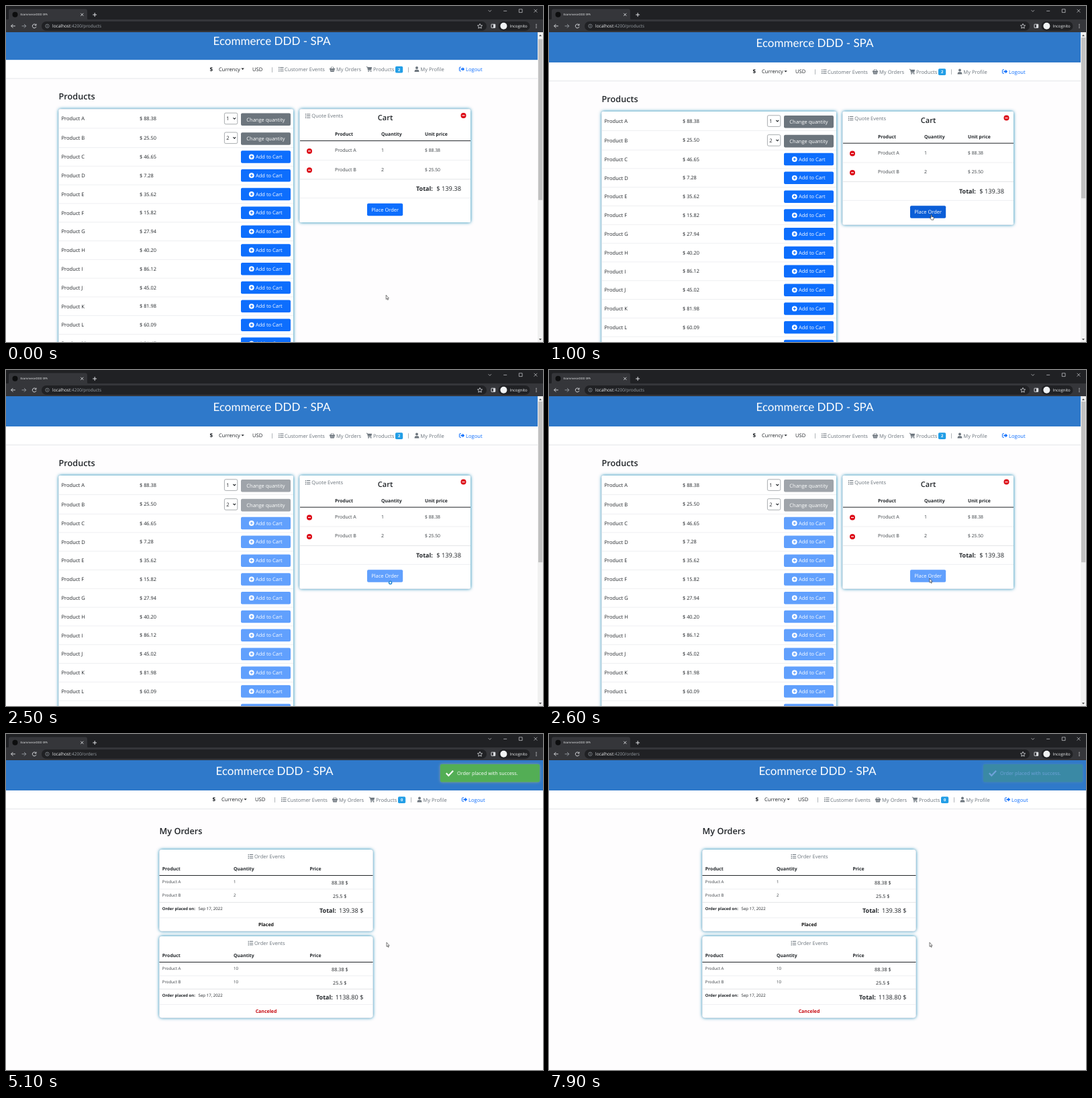
An HTML page that plays this animation: 800 by 500 pixels, repeating every 8 s.

```html
<!DOCTYPE html>
<html lang="en">
<head>
<meta charset="utf-8">
<title>Ecommerce DDD - SPA</title>
<style>
  html, body { margin: 0; height: 100%; overflow: hidden; background: #fefdfe; }
  svg { display: block; width: 800px; height: 500px; font-family: "Open Sans", "Noto Sans", sans-serif; text-rendering: geometricPrecision; }
  .title { font-family: Lato, sans-serif; }
</style>
</head>
<body>
<svg id="stage" viewBox="0 0 800 500"></svg>
<script>
const INK = '#212529', GRAY = '#6c757d', BLUE = '#0d6efd', RED = '#dc0814', LIGHT = '#e3e5e8';
const LOOP = 8000, STEP = 100, ROUTE_CHANGE = 2700;
const PRICES = [88.38, 25.5, 46.65, 7.28, 35.62, 15.82, 27.94, 40.2, 86.12, 45.02, 81.98, 60.09, 31.47];

const clamp = v => Math.max(0, Math.min(1, v));

// Drawing helpers; text is centred vertically on y
const text = (x, y, s, size = 7.6, fill = INK, weight = 400, anchor = 'start', more = '') =>
  `<text x="${x}" y="${y + size * .357}" font-size="${size}" fill="${fill}" font-weight="${weight}" text-anchor="${anchor}" ${more}>${s}</text>`;
const bold = (x, y, s, size = 6.9, fill = INK, anchor) => text(x, y, s, size, fill, 700, anchor);
const rect = (x, y, w, h, fill, r = 0, more = '') =>
  `<rect x="${x}" y="${y}" width="${w}" height="${h}" rx="${r}" fill="${fill}" ${more}/>`;
const circle = (x, y, r, fill, more = '') => `<circle cx="${x}" cy="${y}" r="${r}" fill="${fill}" ${more}/>`;
const stroke = (d, color, width = 1, more = '') =>
  `<path d="${d}" fill="none" stroke="${color}" stroke-width="${width}" ${more}/>`;
const fill = (d, color, more = '') => `<path d="${d}" fill="${color}" ${more}/>`;
const hline = (x, y, w, color = LIGHT, width = .6) => stroke(`M${x} ${y}h${w}`, color, width);
const group = (x, y, body, more = '') => `<g transform="translate(${x} ${y})" ${more}>${body}</g>`;
const card = (x, y, w, h, r) => rect(x, y, w, h, '#fff', r, 'filter="url(#glow)"');
const button = (x, y, w, h, color, body, opacity) =>
  `<g opacity="${opacity}">${rect(x, y, w, h, color, 2)}${body}</g>`;

// Icons, centred on x, y
const listIcon = (x, y) => group(x, y, [-2.6, 0, 2.6].map(d =>
  rect(-3.8, d - .7, 1.4, 1.4, GRAY, .3) + rect(-1.6, d - .5, 5.4, 1, GRAY, .3)).join(''));
const basketIcon = (x, y) => group(x, y,
  stroke('M-2.6-.8L-.8-3.7M2.6-.8L.8-3.7', GRAY) +
  fill('M-4.2-1.2h8.4v1.2h-.6l-.7 3.2q-.2.7-.8.7h-4.2q-.6 0-.8-.7L-3.6 0h-.6z', GRAY) +
  stroke('M-1.5.6v2M0 .6v2M1.5.6v2', '#fff', .5));
const cartIcon = (x, y) => group(x, y,
  stroke('M-4.2-3.3h1.5l1.4 5.4H3.4', GRAY, .9) + fill('M-2.4-2.8h6.6l-1 3.9h-4.6z', GRAY) +
  circle(-1, 3.4, .8, GRAY) + circle(2.7, 3.4, .8, GRAY));
const userIcon = (x, y) => group(x, y,
  circle(0, -1.9, 2, GRAY) + fill('M-3.4 4v-.8q0-2.4 2.4-2.4h2q2.4 0 2.4 2.4V4z', GRAY));
const logoutIcon = (x, y) => group(x, y,
  stroke('M-1-2.8h-1.7q-.9 0-.9.9v3.8q0 .9.9.9H-1', BLUE) +
  fill('M-1.6-.9H1v-2L4.2 0 1 2.9v-2h-2.6z', BLUE));
const removeIcon = (x, y) => circle(x, y, 4, RED) + rect(x - 2, y - .6, 4, 1.2, '#fff');
const addIcon = (x, y) => circle(x, y, 3.9, '#fff') + stroke(`M${x - 2} ${y}h4M${x} ${y - 2}v4`, BLUE, 1.1);

const arrow = fill('M0 0V6.2L1.4 5l1 2.2 .9-.4-1-2.1H4.2z', '#fff', 'stroke="#222" stroke-width=".6"');
const hand = fill('M0 .5q.6-.9 1.2 0V3l2.6.6q.6.2.5 1L3.8 7.8H.6L-1.6 4.8q.3-.9 1.6.1z', '#fff', 'stroke="#111" stroke-width=".6"');
const spinner = circle(3.3, 6.3, 2.1, '#dff0fb', 'stroke="#1a80cf" stroke-width="1.3"');

function header(count) {
  return rect(-8, 39, 820, 45, '#2f79ca') +
    text(396, 55.2, 'Ecommerce DDD - SPA', 17, '#fff', 400, 'middle', 'class="title"') +
    rect(-8, 84, 820, 27.5, '#fff') + hline(-8, 111.5, 820, '#dfe1e4', .8) +
    bold(303.6, 97.5, '$', 8.2) + text(317, 97.5, 'Currency') + fill('M350.4 96.2h4.4l-2.2 2.4z', INK) +
    text(367, 97.5, 'USD') + text(396.5, 97.5, '|', 7.6, GRAY, 400, 'middle') +
    listIcon(409.8, 97.7) + text(415, 98, 'Customer Events', 7.6, GRAY) +
    basketIcon(486, 97.7) + text(492, 98, 'My Orders', 7.6, GRAY) +
    cartIcon(541, 97.5) + text(547, 98, 'Products', 7.6, GRAY) +
    rect(580, 93.3, 11.2, 9.8, '#229ee6', 1.8) + bold(585.6, 98.2, count, 5.8, '#fff', 'middle') +
    text(599.5, 97.5, '|', 7.6, GRAY, 400, 'middle') +
    userIcon(612, 97.5) + text(617.3, 98, 'My Profile', 7.6, GRAY) +
    logoutIcon(679, 97.5) + text(685, 98, 'Logout', 7.6, BLUE);
}

function productRow(price, i, opacity) {
  const inCart = i < 2, y = inCart ? 171 + 28.8 * i : 228 + 27.8 * (i - 2);
  const action = inCart
    ? rect(325.4, y - 8.2, 19.4, 16.6, '#fff', 2, 'stroke="#858a8f" stroke-width=".7"') +
      text(328.2, y + .2, i + 1) + stroke(`M338.4 ${y - 1}l1.9 1.9 1.9-1.9`, INK, 1.1) +
      button(350, y - 8, 74, 18.6, GRAY, text(387, y + 1.6, 'Change quantity', 7.5, '#fff', 400, 'middle'), opacity)
    : button(350, y - 9.2, 74, 18.5, BLUE, addIcon(365.8, y) + text(372, y, 'Add to Cart', 7.5, '#fff'), opacity);
  return text(82.5, y, 'Product ' + String.fromCharCode(65 + i)) + text(199, y, '$ ' + price.toFixed(2), 7.4) +
    action + hline(79, y + (inCart ? 14.5 : 13.9), 349);
}

function cart(t, opacity) {
  const hovered = t >= 1000 && t < 2200;
  const ring = t < 2200 ? clamp((t - 1700) / 300) : 0;
  const items = [['A', 1], ['B', 2]].map(([name, quantity], i) => {
    const y = 218.6 + 28.4 * i;
    return removeIcon(452, y + .9) + text(490, y, 'Product ' + name, 7, '#3b4045') +
      text(559, y, quantity, 7, '#3b4045') + text(624, y, '$ ' + PRICES[i].toFixed(2), 6.8, '#3b4045');
  }).join('');
  return card(437.5, 157, 254.5, 168.5, 2.5) +
    listIcon(449.6, 167.2) + text(455.3, 167.3, 'Quote Events', 7.5, GRAY) +
    text(565, 169.8, 'Cart', 11, INK, 600, 'middle') + removeIcon(681.5, 166.6) +
    bold(490, 194.5, 'Product') + bold(559, 194.5, 'Quantity') + bold(624, 194.5, 'Unit price') +
    hline(438, 204.2, 254, INK, 1) + items + hline(438, 233, 254) + hline(438, 261.4, 254, '#ced2d6') +
    bold(611, 275.4, 'Total:', 9) + text(678, 275.6, '$ 139.38', 9.3, INK, 400, 'end') +
    hline(438, 289.4, 254) +
    rect(537.2, 296.4, 54.8, 20.4, 'none', 3, `stroke="#86b6fe" stroke-width="2" opacity="${ring}"`) +
    button(538, 297.3, 53.2, 18.5, hovered ? '#0b5ed7' : BLUE,
      text(564.6, 306.8, 'Place Order', 7.5, '#fff', 400, 'middle'), opacity);
}

function productsPage(t) {
  const scroll = t < 500 ? 3.6 : 0;
  const opacity = 1 - .35 * clamp((t - 2100) / 200);
  return group(0, -scroll, header(2) + text(78.5, 138, 'Products', 12.7, INK, 600) +
      card(78.5, 157, 349.5, 400, 2.5) + PRICES.map((p, i) => productRow(p, i, opacity)).join('') + cart(t, opacity)) +
    rect(792, 39, 8, 461, '#f1f1f1') + rect(793, 46.8 + scroll * .7, 6.2, 239.4, '#c1c1c1') +
    fill('M794 45l2-2.4 2 2.4z', '#505050') + fill('M794 495l2 2.4 2-2.4z', '#505050');
}

function order(y, quantities, total, status, color) {
  const items = quantities.map((quantity, i) =>
    text(232.8, 48 + 19.8 * i, 'Product ' + 'AB'[i], 6.1, '#3b4045') +
    text(339, 48 + 19.8 * i, quantity, 6.1, '#3b4045') +
    text(497.3, 49.4 + 19.8 * i, PRICES[i] + ' $', 7.25, INK, 400, 'middle') +
    hline(228.5, 58.8 + 19.8 * i, 318, i ? '#ced2d6' : LIGHT)).join('');
  const totalX = 532.4 - total.length * 4.95 - 1;
  return group(0, y, card(228.5, 0, 318, 121.2, 4) +
    listIcon(364.4, 10.2) + text(370, 10.2, 'Order Events', 7.5, GRAY) +
    bold(232.8, 29, 'Product') + bold(339, 29, 'Quantity') + bold(452.4, 29, 'Price') +
    hline(228.5, 38.5, 318, INK, 1) + items +
    bold(232.8, 87.6, 'Order placed on:', 5.95) + text(286.6, 87.8, 'Sep 17, 2022', 6.1) +
    bold(totalX, 91, 'Total:', 9, INK, 'end') + text(532.4, 91.2, total, 9.2, INK, 400, 'end') +
    hline(228.5, 101.6, 318) + bold(387.5, 111.5, status, 7, color, 'middle'));
}

function ordersPage(t) {
  const shown = t < 7500 ? clamp((t - 2600) / 400) : 1 - ((t - 7500) / 480) ** 2;
  return group(4, 0, header(0)) + text(228.6, 144.6, 'My Orders', 12.7, INK, 600) +
    order(172, [1, 2], '139.38 $', 'Placed', '#111') +
    order(301, [10, 10], '1138.80 $', 'Canceled', '#c5050c') +
    `<g opacity="${shown}">` + rect(647, 45, 148, 26.5, '#52ae54', 2, 'filter="url(#shade)"') +
    stroke('M655.8 58.3l3.5 3.6 6.8-7.2', '#fff', 2.2) +
    text(672, 58.4, 'Order placed with success.', 7.3, '#fff') + '</g>';
}

function browser(path) {
  const pale = '#dfe1e5', dim = '#9aa0a6';
  return rect(0, 0, 800, 20.5, '#202124') + rect(0, 20, 800, 19, '#35363a') +
    fill('M2 20.5q2 0 2-2V7.5q0-3 3-3H118q3 0 3 3v11q0 2 2 2z', '#35363a') +
    circle(13.5, 12.8, 4, '#0c0d0e') + text(21.5, 12.7, 'EcommerceDDD SPA', 4.2, '#f1f3f4') +
    stroke('M111.3 10.8l4 4m0-4l-4 4', pale, .9) + stroke('M129.3 13h5.8M132.2 10.1v5.8', pale) +
    stroke('M718.6 6.2l2.2 2.2 2.2-2.2M741.2 7.4h5M764.3 4.8h4.8v4.8h-4.8zM786.6 4.8l4.8 4.8m0-4.8l-4.8 4.8', '#d0d2d5', .7) +
    stroke('M13.8 29.8H7.6m2.8-2.8l-2.8 2.8 2.8 2.8', pale, .9) +
    stroke('M23.6 29.8h6.2m-2.8-2.8l2.8 2.8-2.8 2.8', dim, .9) +
    stroke('M44.6 28.2a2.9 2.9 0 1 0 .4 2.6M45 26.6v2.2h-2.3', pale, .9) +
    rect(53, 23, 663, 13.8, '#202124', 6.9) +
    circle(61.5, 29.8, 2.7, 'none', `stroke="${dim}" stroke-width=".7"`) + stroke('M61.5 29.4v1.8M61.5 28v.7', dim, .7) +
    text(69, 29.8, `localhost<tspan fill="${dim}">:4200/${path}</tspan>`, 6.5, '#f1f3f4') +
    stroke('M706 26.4l1.1 2.3 2.5.3-1.9 1.7.5 2.5-2.2-1.2-2.2 1.2.5-2.5-1.9-1.7 2.5-.3z', pale, .8) +
    rect(723, 27.2, 5.8, 5.2, 'none', .4, `stroke="${pale}" stroke-width=".9"`) + rect(726, 27.2, 2.8, 5.2, pale) +
    rect(733.5, 23, 47, 13.8, '#202124', 6.9) + circle(741.4, 29.8, 5, '#f1f3f4') +
    text(750.6, 29.9, 'Incognito', 6, '#f1f3f4') +
    [27.4, 29.8, 32.2].map(y => circle(790, y, .7, pale)).join('');
}

function pointer(t) {
  if (t < 500) return group(566.2, 430.2, arrow);
  if (t >= 2600) return group(567, 310.2, arrow);
  if (t >= 2200) return group(569.3, 310.2, spinner);
  const k = clamp((t - 600) / 400);
  return group(570 - k, 385.8 - 75.4 * k * k * (3 - 2 * k), k < 1 ? arrow : hand);
}

const defs = `<defs>
  <filter id="glow" filterUnits="userSpaceOnUse" x="0" y="-50" width="800" height="700"><feDropShadow dx="0" dy="0" stdDeviation="2.4" flood-color="#0c7bab"/></filter>
  <filter id="shade" x="-10%" y="-40%" width="120%" height="180%"><feDropShadow dx="0" dy="0" stdDeviation="2" flood-color="#8fa08f"/></filter>
</defs>`;

const stage = document.getElementById('stage');
let drawn = -1;
function frame() {
  const t = Math.floor(performance.now() % LOOP / STEP) * STEP;
  if (t !== drawn) {
    const shopping = t < ROUTE_CHANGE;
    stage.innerHTML = defs + (shopping ? productsPage(t) : ordersPage(t)) +
      browser(shopping ? 'products' : 'orders') + pointer(t);
    drawn = t;
  }
  requestAnimationFrame(frame);
}
frame();
</script>
</body>
</html>
```
